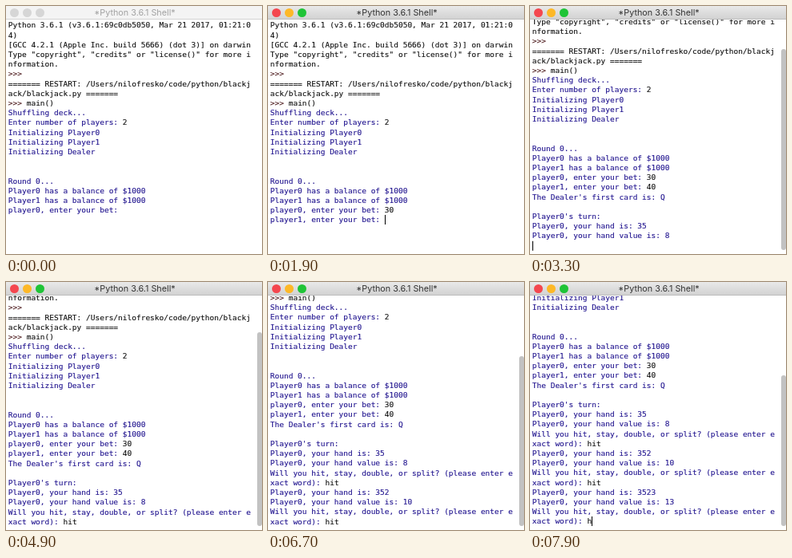
These frames come from a looping animation (320 px wide and 311 px high, 8000 ms). An HTML page:

```html
<!DOCTYPE html>
<html lang="en">
<head>
<meta charset="utf-8">
<title>Python Shell</title>
<style>
html, body { margin: 0; width: 100%; height: 100%; overflow: hidden; background: #fff; }
#win { position: relative; width: 320px; height: 311px; overflow: hidden; }
#bar {
  position: absolute; inset: 0 0 auto; height: 16px;
  border-bottom: 1px solid #bdbdbd;
  background: linear-gradient(#e9e9e9, #d2d2d2);
  font: 10.8px/17px Inter, Roboto, sans-serif; color: #333;
}
#title { position: absolute; left: 1px; width: 320px; text-align: center; white-space: pre; }
.dot { position: absolute; top: 2.5px; width: 11px; height: 11px; border-radius: 50%; }
.dot:nth-child(1) { left: 5px; background: #f4474f; }
.dot:nth-child(2) { left: 21px; background: #fdb827; }
.dot:nth-child(3) { left: 37px; background: #1fc437; }
.idle #bar { background: #f4f4f4; border-color: #d4d4d4; color: #a2a2a2; }
.idle .dot { background: #d6d6d6; }
#view { position: absolute; inset: 17px 0 3px; overflow: hidden; }
#log {
  position: absolute; left: 2.8px; top: 1.3px; margin: 0; white-space: pre;
  font: 9.5px/12.2px "DejaVu Sans Mono", monospace; color: #111;
  -webkit-text-stroke: .12px;
}
.out { color: #21148f; }
.prompt { color: #4c1a1c; }
#caret { position: absolute; width: 1px; height: 12px; background: #000; }
.off #caret, .idle #caret { visibility: hidden; }
#thumb { position: absolute; right: 0; width: 6px; border-radius: 3px; background: #c2c2c2; }
</style>
</head>
<body>
<div id="win">
  <div id="bar"><b class="dot"></b><b class="dot"></b><b class="dot"></b><span id="title">*Python 3.6.1 Shell*</span></div>
  <div id="view">
    <pre id="log"><span id="text"></span><span id="caret"></span></pre>
    <div id="thumb"></div>
  </div>
</div>
<script>
const LOOP = 8000, FOCUS = 400, ROW = 12.2, PAGE = 288.2, TRACK = 287;
const $ = id => document.getElementById(id);
const ask = 'Will you hit, stay, double, or split? (please enter e\nxact word): ';
const hand = (cards, value) =>
  `Player0, your hand is: ${cards}\nPlayer0, your hand value is: ${value}\n`;

// Each entry: time, style, text
const events = [
  [0, 'in', 'Python 3.6.1 (v3.6.1:69c0db5050, Mar 21 2017, 01:21:0\n4)\n' +
    '[GCC 4.2.1 (Apple Inc. build 5666) (dot 3)] on darwin\n' +
    'Type "copyright", "credits" or "license()" for more i\nnformation.\n'],
  [0, 'prompt', '>>> \n'],
  [0, 'in', '======= RESTART: /Users/nilofresko/code/python/blackj\nack/blackjack.py =======\n'],
  [0, 'prompt', '>>> '],
  [0, 'in', 'main()\n'],
  [0, 'out', 'Shuffling deck...\nEnter number of players: '],
  [0, 'in', '2\n'],
  [0, 'out', 'Initializing Player0\nInitializing Player1\nInitializing Dealer\n\n\n' +
    'Round 0...\nPlayer0 has a balance of $1000\nPlayer1 has a balance of $1000\n' +
    'player0, enter your bet: '],
  [1050, 'in', '3'], [1250, 'in', '0'], [1550, 'in', '\n'],
  [1600, 'out', 'player1, enter your bet: '],
  [2150, 'in', '4'], [2350, 'in', '0'], [2650, 'in', '\n'],
  [2700, 'out', "The Dealer's first card is: Q\n"],
  [2950, 'out', "\nPlayer0's turn:\n"],
  [3150, 'out', hand('35', 8)],
  [3550, 'out', ask],
  [3950, 'in', 'h'], [4050, 'in', 'i'], [4200, 'in', 't'], [4980, 'in', '\n'],
  [5010, 'out', hand('352', 10)],
  [5050, 'out', ask],
  [5850, 'in', 'h'], [5950, 'in', 'i'], [6050, 'in', 't'], [6920, 'in', '\n'],
  [6980, 'out', hand('3523', 13)],
  [7150, 'out', ask],
  [7850, 'in', 'h']
];

let shown = -1;

function print(count) {
  const done = events.slice(0, count);
  $('text').replaceChildren(...done.map(([, kind, text]) => {
    const span = document.createElement('span');
    span.className = kind;
    span.textContent = text;
    return span;
  }));
  const rows = done.map(e => e[2]).join('').split('\n').length;
  const height = rows * ROW + 4;
  const scroll = Math.max(0, rows * ROW - PAGE);
  $('log').style.transform = `translateY(${-scroll}px)`;
  $('thumb').style.display = scroll ? 'block' : 'none';
  $('thumb').style.top = 2 + TRACK * scroll / height + 'px';
  $('thumb').style.height = TRACK * (height - scroll) / height + 'px';
}

function draw() {
  const t = performance.now() % LOOP;
  const count = events.filter(e => e[0] <= t).length;
  if (count !== shown) print(shown = count);
  // The caret restarts its 600 on / 300 off blink at every change
  const since = t - Math.max(FOCUS, events[count - 1][0]);
  $('win').className = t < FOCUS ? 'idle' : since % 900 < 600 ? '' : 'off';
  requestAnimationFrame(draw);
}
draw();
</script>
</body>
</html>
```
